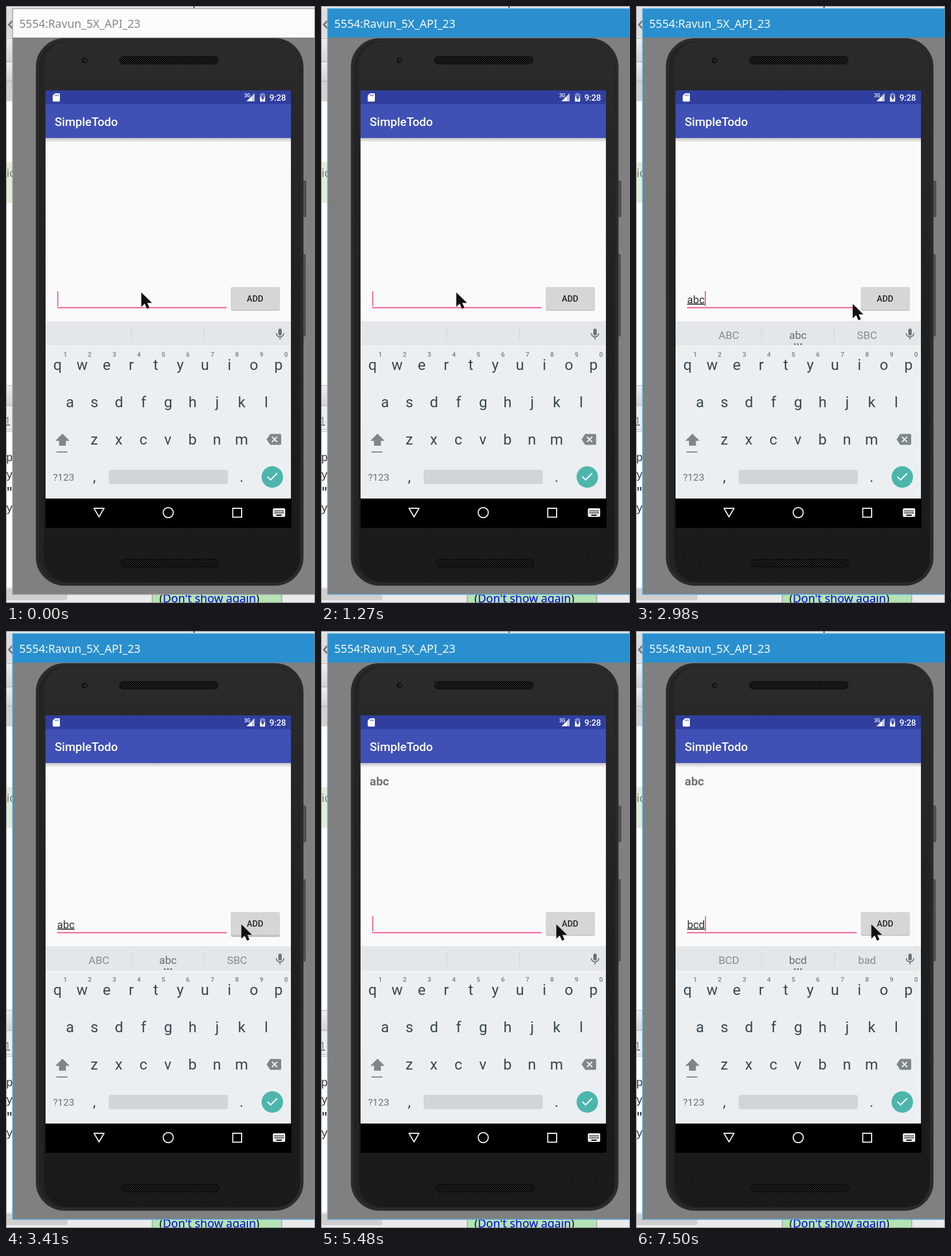
An HTML page that plays this animation: 539x1040 px, repeating every 8 s.

```html
<!DOCTYPE html>
<html lang="en">
<head>
<meta charset="utf-8">
<style>
html, body { margin: 0; width: 100%; height: 100%; overflow: hidden; }
svg { display: block; width: 100%; height: 100%; }
text { font-family: Roboto, sans-serif; white-space: pre; }
.ui { font-family: "Noto Sans", "Open Sans", sans-serif; }
.mono { font-family: "Liberation Mono", monospace; font-size: 20px; }
.mid { text-anchor: middle; }
.medium { font-weight: 500; }
</style>
</head>
<body>
<svg viewBox="0 0 539 1040" xmlns="http://www.w3.org/2000/svg">
<defs>
  <linearGradient id="body" x2="0" y2="1">
    <stop stop-color="#2b2b2b"/><stop offset=".5" stop-color="#202020"/><stop offset="1" stop-color="#1a1a1a"/>
  </linearGradient>
  <linearGradient id="shade" x2="0" y2="1">
    <stop stop-color="#c4c4c4"/><stop offset="1" stop-color="#fafafa"/>
  </linearGradient>
  <linearGradient id="bar" x2="0" y2="1">
    <stop stop-color="#f0f0f0"/><stop offset="1" stop-color="#d4d4d4"/>
  </linearGradient>
  <pattern id="mesh" width="4" height="4" patternUnits="userSpaceOnUse">
    <rect width="4" height="4" fill="#2c2c2c"/><circle cx="1" cy="1" r="1.2"/><circle cx="3" cy="3" r="1.2"/>
  </pattern>
</defs>

<!-- window behind -->
<rect width="539" height="1040" fill="#fff"/>
<rect width="539" height="5" fill="#e6e6e6"/>
<rect x="327" width="2" height="3" fill="#222"/>
<rect y="5" width="11" height="50" fill="#dedede"/>
<path d="M11 26L5 32.500L11 39" fill="none" stroke="#777" stroke-width="3"/>
<rect y="55" width="11" height="42" fill="url(#bar)"/>
<rect y="97" width="11" height="34" fill="url(#bar)"/>
<rect y="131" width="11" height="35" fill="#d2d2d2"/>
<rect y="272" width="11" height="71" fill="#e0eed8"/>
<text class="ui" x="1" y="298" font-size="19" fill="#777">ic</text>
<rect y="661" width="11" height="35" fill="url(#bar)"/>
<rect y="696" width="11" height="42" fill="#eee"/>
<path d="M0 56.500H11M0 97.500H11M0 131H11M0 661H11M0 696H11M0 738H11M0 741H11" stroke="#aaa"/>
<text class="ui" x="-2" y="728" font-size="17" fill="#777">1</text>
<path d="M0 730H7" stroke="#777" stroke-width="2"/>
<g fill="#333">
  <text class="mono" x="0" y="793">p</text>
  <text class="mono" x="0" y="823">y</text>
  <text class="mono" x="0" y="853" font-weight="bold">"</text>
  <text class="mono" x="0" y="881">y</text>
</g>
<rect y="1012" width="539" height="28" fill="#ebebeb"/>
<rect y="1015" width="107" height="20" rx="3" fill="#cfcfcf"/>
<rect x="255" y="1024" width="226" height="16" fill="#b5e3b5" stroke="#888"/>
<text class="ui" x="267.500" y="1039" font-size="20" fill="#111">(<tspan fill="#00d" text-decoration="underline">Don't show again</tspan>)</text>

<!-- emulator window -->
<rect x="11" y="5" width="528" height="1020" fill="#808080"/>
<rect id="title" x="11" y="5" width="528" height="50"/>
<path id="edge" d="M539 4.500H11.500V1025H539" fill="none" stroke-width="1.500"/>
<text id="name" class="ui" x="23" y="38" font-size="19.800">5554:Ravun_5X_API_23</text>

<!-- phone -->
<rect x="517" y="305" width="6" height="62" rx="1" fill="#555" stroke="#333"/>
<rect x="516" y="433" width="6" height="142" rx="1" fill="#555" stroke="#333"/>
<rect x="53" y="57" width="465" height="952" rx="49" fill="#232323" stroke="#303030" stroke-width="2"/>
<rect x="56" y="60" width="459" height="946" rx="46" fill="none" stroke="#323232" stroke-width="1.500"/>
<rect x="66" y="62" width="446" height="942" rx="42" fill="url(#body)"/>
<circle cx="137" cy="95" r="5" fill="#141414"/><circle cx="138" cy="95" r="2" fill="#333"/>
<rect x="198" y="88" width="172" height="13" rx="6.500" fill="url(#mesh)" stroke="#111" stroke-width="1.500"/>
<rect x="201" y="964" width="170" height="13" rx="6.500" fill="url(#mesh)" stroke="#0c0c0c" stroke-width="1.500"/>

<!-- app -->
<rect x="69" y="147" width="428" height="403" fill="#fafafa"/>
<rect x="69" y="147" width="428" height="25" fill="#303f9f"/>
<rect x="69" y="171" width="428" height="59" fill="#3f51b5"/>
<rect x="69" y="230" width="428" height="8" fill="url(#shade)"/>
<g fill="#fff">
  <path d="M85.500 152H92.500Q94 152 94 153.500V165Q94 166.500 92.500 166.500H83Q81.500 166.500 81.500 165V156Z"/>
  <path d="M86 154V157M88.500 154V157M91 154V157" stroke="#303f9f"/>
  <text class="medium" x="415.500" y="159" font-size="8.500">3G</text>
  <path d="M433.500 152V166H419.500Z" opacity=".4"/><path d="M429 157V166H419.500Z"/>
  <path d="M429 156.500L433.500 152V166H429Z" opacity=".55"/>
  <path d="M445.500 153V151.500H449.500V153H452V159H443V153Z" opacity=".4"/><path d="M443 158H452V166.500H443Z"/>
  <path d="M448.500 154L444.500 160.500H447V165L451 158.500H448.500Z" fill="#303f9f"/>
  <text class="medium" x="459.500" y="165" font-size="14.700">9:28</text>
  <text class="medium" x="85" y="209" font-size="20.800">SimpleTodo</text>
</g>
<text id="item" x="85" y="269" font-size="20.800" font-weight="bold" fill="#737373">abc</text>
<rect x="89" y="524.500" width="296" height="2" fill="#f4568f"/>
<text id="typed" x="89.300" y="517.500" font-size="18.700" fill="#333"></text>
<rect id="caret" y="497" width="1.600" height="26" fill="#e8407f"/>
<rect id="lift" x="392.500" y="491" width="85" height="40" rx="2.500" fill="#c0c0c0"/>
<rect x="392" y="489.500" width="85.500" height="40" rx="2.500" fill="#d5d7d7"/>
<text class="mid medium" x="434.500" y="514.500" font-size="14.600" fill="#222">ADD</text>

<!-- keyboard -->
<rect x="69" y="549" width="428" height="44" fill="#e4e7e9"/>
<rect x="69" y="592" width="428" height="266" fill="#eceff2"/>
<path d="M69 592.500H497" stroke="#f6f8f9"/>
<path d="M219 560V584M346 560V584" stroke="#cdd2d4"/>
<g class="mid" font-size="18.700" fill="#838c91">
  <text id="s0" x="162" y="579.500"></text>
  <text id="s1" x="282.500" y="579.500" fill="#626d73"></text>
  <text id="s2" x="403" y="579.500"></text>
</g>
<g id="dots" fill="#55636a"><circle cx="277" cy="589" r="1.500"/><circle cx="282.500" cy="589" r="1.500"/><circle cx="288" cy="589" r="1.500"/></g>
<rect x="475" y="562" width="6" height="12" rx="3" fill="#6a747a"/>
<path d="M471.500 570A6.500 6.500 0 0 0 484.500 570M478 576.500V581" fill="none" stroke="#6a747a" stroke-width="1.800"/>
<g id="keys" class="mid" font-size="26" fill="#37474f"></g>
<path d="M98.500 745L111 757.500H104.500V766H92.500V757.500H86Z" fill="#7d878b"/>
<path d="M88 777H107" stroke="#7d878b" stroke-width="2"/>
<path d="M461 745.500H478Q480 745.500 480 747.500V762.500Q480 764.500 478 764.500H461L454.500 755Z" fill="#7d878b"/>
<path d="M464 750.500L473 759.500M473 750.500L464 759.500" stroke="#eceff2" stroke-width="2.200"/>
<text x="82" y="826.500" font-size="17.200" fill="#68757b">?123</text>
<rect x="179" y="808" width="208" height="25" rx="4" fill="#d1d5d7"/>
<circle cx="464.500" cy="820.500" r="18.700" fill="#4db6ac"/>
<path d="M456 820L461.500 825.500L473 814" fill="none" stroke="#fff" stroke-width="2.200"/>
<rect x="69" y="858" width="429" height="51"/>
<g fill="none" stroke="#eee" stroke-width="2">
  <path d="M153.500 875H171L162.300 890Z" stroke-linejoin="round"/>
  <circle cx="283" cy="882.500" r="8.800"/>
  <rect x="395.500" y="875" width="15.500" height="15.500"/>
</g>
<rect x="465.500" y="875" width="21.500" height="15" rx="2" fill="#eee"/>
<path d="M468.500 879.500H485M468.500 883H485" stroke="#000" stroke-width="2" stroke-dasharray="2 1.400"/>
<path d="M471.500 887H481" stroke="#000" stroke-width="2"/>

<path id="mouse" d="M0 0V25L6 19.500L10 28.500L14.200 26.500L10.300 18.300H18.700Z" fill="#111"/>
<rect x=".5" y=".5" width="538" height="1039" fill="none" stroke="#858585"/>
</svg>
<script>
const $ = id => document.getElementById(id);
const LOOP = 8000;

// Each step changes part of the state and holds until the next.
const steps = [
  [0, { active: false, caret: true, text: "", line: false, hints: [], mouse: [236, 499], lift: 0, item: false }],
  [590, { caret: false }],
  [990, { caret: true }],
  [1270, { active: true }],
  [1520, { caret: false }],
  [1920, { caret: true, text: "a" }],
  [2040, { hints: ["and", "a", "as"] }],
  [2200, { text: "ab" }],
  [2340, { hints: ["an", "ab", "about"], line: true }],
  [2460, { text: "abc", line: false }],
  [2590, { hints: ["ABC", "abc", "SBC"], line: true }],
  [2740, { mouse: [262, 505] }],
  [2860, { mouse: [330, 516] }],
  [2980, { mouse: [378, 519] }],
  [3110, { mouse: [403, 512], caret: false }],
  [3280, { mouse: [410.5, 511] }],
  [3410, { lift: 2 }],
  [3560, { text: "", line: false, caret: true, item: true, lift: 0 }],
  [3740, { hints: [] }],
  [4010, { caret: false }],
  [4540, { caret: true }],
  [4950, { caret: false }],
  [5480, { caret: true }],
  [6100, { caret: false }],
  [6540, { caret: true }],
  [6940, { text: "b" }],
  [7100, { hints: ["B", "b", "but"], line: true }],
  [7250, { text: "bc", line: false }],
  [7380, { text: "bcd", hints: ["BC", "bc", "by"] }],
  [7500, { hints: ["BCD", "bcd", "bad"], line: true }]
];

const PITCH = 42.8;
const label = (s, x, y, attrs = "") => `<text x="${x}" y="${y}" ${attrs}>${s}</text>`;
const row = (s, x, y, attrs) => [...s].map((c, i) => label(c, x + i * PITCH, y, attrs)).join("");
$("keys").innerHTML =
  row("qwertyuiop", 90, 634) + row("asdfghjkl", 111.5, 699) + row("zxcvbnm", 154, 764) +
  row("1234567890", 103.3, 610.5, 'font-size="11.5" font-weight="500" fill="#737e83"') +
  label(",", 154, 829) + label(".", 411, 829);

const show = (id, on) => $(id).setAttribute("visibility", on ? "visible" : "hidden");

function draw(s) {
  $("title").setAttribute("fill", s.active ? "#2a8fce" : "#fbfbfb");
  $("edge").setAttribute("stroke", s.active ? "#58aee0" : "#a0a0a0");
  $("name").setAttribute("fill", s.active ? "#f4faff" : "#888");
  $("typed").textContent = s.text;
  $("typed").setAttribute("text-decoration", s.line ? "underline" : "none");
  $("caret").setAttribute("x", 89.6 + (s.text ? $("typed").getComputedTextLength() : 0));
  show("caret", s.caret);
  show("item", s.item);
  show("dots", s.hints.length);
  for (let i = 0; i < 3; i++) $("s" + i).textContent = s.hints[i] || "";
  $("lift").setAttribute("y", 491 + s.lift);
  $("mouse").setAttribute("transform", `translate(${s.mouse})`);
}

const start = performance.now();
let shown = 0;

function frame(now) {
  const t = Math.max(0, now - start) % LOOP;
  const passed = steps.filter(([at]) => at <= t);
  if (passed.length !== shown) {
    shown = passed.length;
    draw(Object.assign({}, ...passed.map(([, change]) => change)));
  }
  requestAnimationFrame(frame);
}
frame(start);
</script>
</body>
</html>
```
